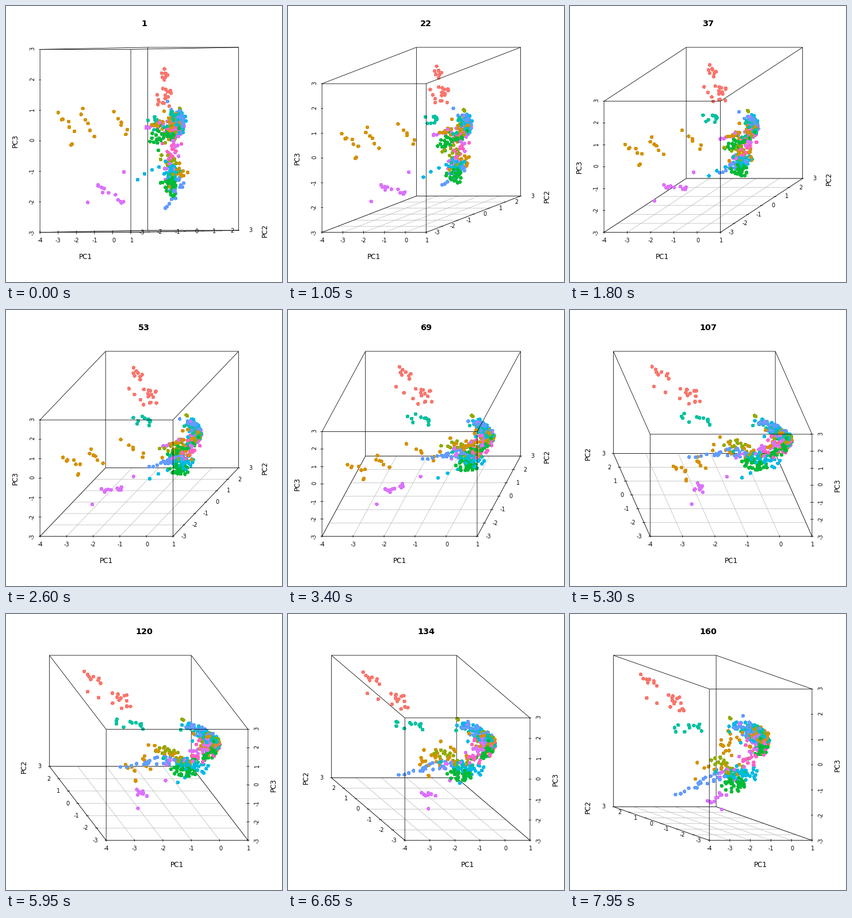
A matplotlib script that plays this animation: 480 px wide and 480 px high, repeating every 8 s.

```python
import numpy as np
import matplotlib.pyplot as plt
from matplotlib.animation import FuncAnimation
from matplotlib.collections import LineCollection

plt.rcParams["font.family"] = "DejaVu Sans"
SIZE, DPI = 480, 72
FRAMES, STEP = 160, 50

RED, ORANGE, OLIVE = "#F8766D", "#D39200", "#93AA00"
GREEN, TEAL, CYAN = "#00BA38", "#00C19F", "#00B9E3"
BLUE, PURPLE, PINK = "#619CFF", "#DB72FB", "#FF61C3"

# Box of 5 x 6 x 6 units; points are measured from its lower front-left corner.
WIDE, DEEP, HIGH = 5, 6, 6
LEFT, RIGHT, SPAN = 59.1, 420.9, 345.4
BASE, TALL = 393.7, 321.8


def strand(rng, count, start, end, jitter):
    """Points spaced along a segment and scattered around it."""
    t = np.linspace(0, 1, count)[:, None]
    pts = np.array(start) * (1 - t) + np.array(end) * t
    pts += rng.normal(0, 1, pts.shape) * jitter
    pts[:, 0] = np.minimum(pts[:, 0], 4.9)
    return pts


def cap(rng, count, depth, height):
    """Points on the curved shell whose tip touches the right wall."""
    y = rng.normal(depth, .26, count)
    z = rng.normal(height, .18, count) + .25 * (y - depth)
    x = 4.9 - .7 * (y - 2.75) ** 2 - 1.2 * (z - 3.5) ** 2
    return np.column_stack([x - np.abs(rng.normal(0, .16, count)), y, z])


def make_points():
    rng = np.random.default_rng(12)
    rows, colors = [], []

    def add(color, pts):
        rows.append(pts)
        colors.extend([color] * len(pts))

    def line(color, count, start, end, jitter):
        add(color, strand(rng, count, start, end, jitter))

    # outlying groups
    line(RED, 8, (1.15, 5.7, 5.25), (1.6, 5.35, 4.95), .06)
    line(RED, 4, (1.16, 5.4, 4.46), (2.1, 4.5, 4.15), .04)
    line(RED, 12, (1.85, 5.0, 4.65), (2.45, 4.65, 4.2), .1)
    line(ORANGE, 6, (.77, .2, 3.85), (1.2, .65, 3.4), .06)
    line(ORANGE, 2, (1.21, .51, 2.86), (1.22, .56, 2.89), 0)
    line(ORANGE, 6, (1.55, .75, 4.1), (1.8, 1.1, 3.1), .06)
    line(ORANGE, 6, (2.4, 1.7, 3.9), (3.25, 1.6, 3.25), .06)
    line(PURPLE, 11, (1.75, 1.35, 1.55), (2.05, 2.65, .95), .08)
    line(PURPLE, 2, (1.5, 1.14, .97), (2.73, 1.91, 1.96), 0)
    line(TEAL, 11, (1.85, 4.55, 3.35), (2.65, 3.75, 3.7), .1)
    line(BLUE, 6, (2.1, 4.85, .72), (3.0, 4.5, 1.15), .04)
    line(CYAN, 4, (3.25, 2.15, 1.73), (4.1, 2.5, 2.08), .03)

    outer = len(colors)

    # lower arm
    line(BLUE, 18, (2.95, 4.5, 1.35), (3.7, 3.85, 1.65), .13)
    line(GREEN, 32, (3.6, 3.65, 1.35), (4.15, 3.1, 1.6), .13)
    line(CYAN, 24, (3.75, 3.5, 1.8), (4.45, 2.8, 2.2), .15)
    line(TEAL, 10, (3.5, 3.8, 1.8), (4.1, 3.3, 2.0), .16)
    line(OLIVE, 18, (3.1, 3.9, 2.4), (4.1, 3.3, 1.9), .19)
    line(ORANGE, 12, (2.9, 4.55, 1.8), (4.2, 3.6, 2.0), .15)
    line(PURPLE, 12, (3.4, 3.8, 1.7), (4.6, 2.9, 2.9), .15)
    line(PINK, 14, (4.2, 3.1, 2.3), (4.6, 2.7, 3.0), .1)

    # two wings of the main cloud
    line(GREEN, 14, (4.2, 2.15, 2.95), (4.4, 2.2, 3.4), .1)
    line(ORANGE, 9, (4.1, 2.2, 3.45), (4.4, 2.35, 3.6), .06)
    line(PURPLE, 8, (3.67, 2.05, 3.42), (4.4, 2.5, 3.5), .05)
    line(OLIVE, 2, (3.94, 3.79, 4.02), (3.98, 3.78, 3.98), 0)
    line(CYAN, 10, (4.0, 3.85, 3.8), (4.5, 3.4, 3.7), .08)
    line(TEAL, 6, (3.95, 3.7, 3.6), (4.4, 3.4, 3.6), .08)

    # main cloud
    for color, count, depth, height in [
            (TEAL, 44, 2.85, 3.50), (CYAN, 34, 3.1, 3.55),
            (BLUE, 46, 3.15, 3.62), (PURPLE, 36, 2.95, 3.40),
            (ORANGE, 54, 2.78, 3.52), (GREEN, 28, 2.60, 3.20),
            (OLIVE, 16, 2.90, 3.50), (PINK, 18, 2.80, 3.25)]:
        add(color, cap(rng, count, depth, height))

    order = np.r_[:outer, outer + rng.permutation(len(colors) - outer)]
    return np.vstack(rows)[order], [colors[i] for i in order]


class View:
    """Oblique projection for a viewing angle in degrees."""

    def __init__(self, angle):
        turn = angle / 90
        self.flip = turn > 1
        self.shear = 1 - turn
        self.rise = 1 - abs(self.shear)
        self.sx = SPAN / (WIDE + DEEP * abs(self.shear))
        self.sy = TALL / (HIGH + DEEP * self.rise)
        self.x0 = RIGHT - WIDE * self.sx if self.flip else LEFT

    def __call__(self, pts):
        x, y, z = np.asarray(pts, float).T
        return np.column_stack([self.x0 + self.sx * (x + self.shear * y),
                                BASE - self.sy * (z + self.rise * y)])


fig = plt.figure(figsize=(SIZE / DPI, SIZE / DPI), dpi=DPI, facecolor="white")
ax = fig.add_axes([0, 0, 1, 1])
ax.set_xlim(0, SIZE)
ax.set_ylim(SIZE, 0)
ax.axis("off")


def line_set(color, z):
    lines = LineCollection([], colors=color, linewidths=.8, zorder=z)
    lines.set_snap(False)
    return ax.add_collection(lines)


def label(text, size, **kw):
    return ax.text(0, 0, text, size=size, va="baseline", zorder=1.5,
                   rotation_mode="anchor", **{"ha": "center", **kw})


grid = line_set("#BEBEBE", 1)
back = line_set("black", 1.2)
front = line_set("black", 3)
xyz, colors = make_points()
dots = ax.scatter(xyz[:, 0], xyz[:, 1], s=5.4 ** 2, c=colors, linewidths=0,
                  antialiased=False, zorder=2)

title = label("", 14.4, weight="bold")
title.set_position((240, 34.8))
xname = label("PC1", 12)
yname = label("PC2", 12, rotation=90)
zname = label("PC3", 12, rotation=90)
xnums = [label(str(i - 4), 9.6) for i in range(WIDE + 1)]
ynums = [label(str(i - 3), 9.6) for i in range(DEEP + 1)]
znums = [label(str(i - 3), 9.6, rotation=90) for i in range(HIGH + 1)]


def pad(value):
    """Width of the blank that stands in for a minus sign."""
    return 0 if value < 0 else 3


def draw(i):
    view = View(i + 1)
    near, far = (0, WIDE) if view.flip else (WIDE, 0)

    def edges(pairs):
        return [view(pair) for pair in pairs]

    grid.set_segments(edges(
        [[(x, 0, 0), (x, DEEP, 0)] for x in range(WIDE + 1)]
        + [[(0, y, 0), (WIDE, y, 0)] for y in range(DEEP + 1)]))

    box = [[(x, 0, 0), (x, DEEP, 0)] for x in (0, WIDE)]
    box += [[(0, y, 0), (WIDE, y, 0)] for y in (0, DEEP)]
    box += [[(x, DEEP, 0), (x, DEEP, HIGH)] for x in (0, WIDE)]
    box += [[(0, DEEP, HIGH), (WIDE, DEEP, HIGH)],
            [(far, 0, HIGH), (far, DEEP, HIGH)],
            [(far, 0, 0), (far, 0, HIGH)]]
    ticks = [[(x, 0, -.06), (x, 0, .06)] for x in range(WIDE + 1)]
    ticks += [[(near - .05, y, 0), (near + .05, y, 0)] for y in range(DEEP + 1)]
    ticks += [[(far - .05, 0, z), (far + .05, 0, z)] for z in range(HIGH + 1)]
    back.set_segments(edges(box + ticks))

    front.set_segments(edges([
        [(0, 0, HIGH), (WIDE, 0, HIGH)],
        [(near, 0, HIGH), (near, DEEP, HIGH)],
        [(near, 0, 0), (near, 0, HIGH)]]))
    dots.set_offsets(view(xyz))

    title.set_text(str(i + 1))
    for k, t in enumerate(xnums):
        t.set_position((view([(k, 0, 0)])[0, 0] + pad(k - 4) / 2, 410.9))
    for k, t in enumerate(ynums):
        x, y = view([(near, k, 0)])[0]
        t.set_ha("right" if view.flip else "left")
        t.set_position((x - 14.4 if view.flip else x + 14.4 + pad(k - 3), y + 3.2))
    for k, t in enumerate(znums):
        y = view([(0, 0, k)])[0, 1]
        t.set_position((439.7 if view.flip else 49, y - pad(k - 3) / 2))

    xname.set_position((view([(WIDE / 2, 0, 0)])[0, 0], 439.7))
    yname.set_position((34.6 if view.flip else 454.1, view([(0, DEEP, 0)])[0, 1]))
    zname.set_position((468.5 if view.flip else 20.2, view([(0, 0, HIGH / 2)])[0, 1]))
    return []


anim = FuncAnimation(fig, draw, frames=FRAMES, interval=STEP,
                     init_func=lambda: draw(0), repeat=True, repeat_delay=0)
plt.show()
```
